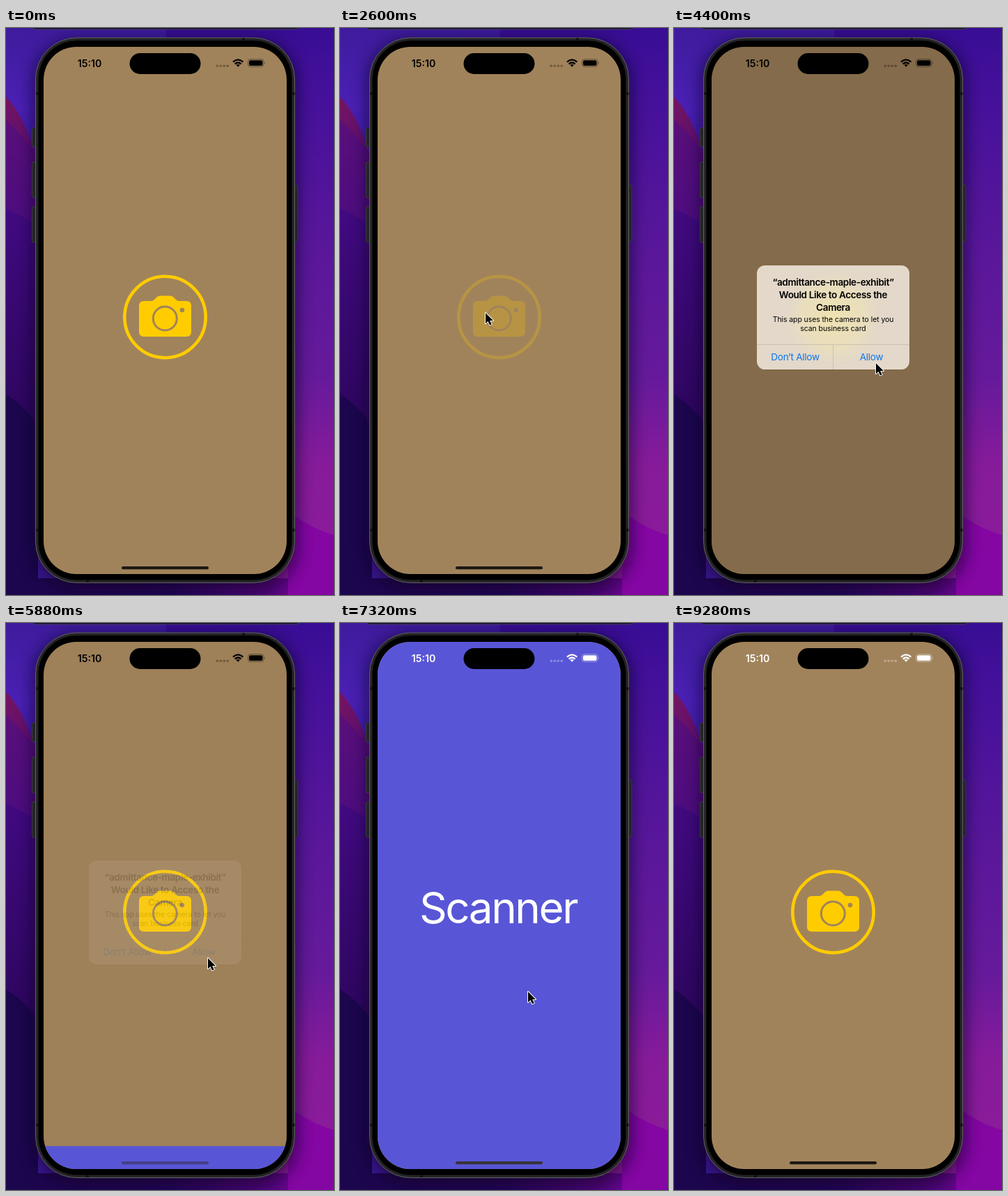
An HTML page for the animation above (9.32 s loop, 471 by 812 pixels).

```html
<!DOCTYPE html>
<html lang="en">
<head>
<meta charset="utf-8">
<title>Camera permission</title>
<style>
  html, body { margin: 0; width: 100%; height: 100%; overflow: hidden; background: #2a0e85; }
  svg { display: block; width: 100%; height: 100%; }
  text { font-family: Inter, Roboto, "Liberation Sans", sans-serif; text-anchor: middle; }
  .title { font-size: 13.6px; font-weight: 600; letter-spacing: -.4px; }
  .note { font-size: 10.5px; letter-spacing: -.09px; }
  .action { font-size: 13.6px; letter-spacing: -.3px; fill: #0a76ee; }
  .clock { font-size: 14.2px; font-weight: 600; }
  .heading { font-size: 62px; letter-spacing: -.04em; fill: #fff; }
</style>
</head>
<body>
<svg viewBox="0 0 471 812" preserveAspectRatio="none">
  <defs>
    <linearGradient id="top" x2="0" y2="1">
      <stop offset="0" stop-color="#3f1b9c"/><stop offset=".14" stop-color="#4a20b4"/>
      <stop offset=".24" stop-color="#3f1aa0"/>
    </linearGradient>
    <linearGradient id="wave" x2="0" y2="1">
      <stop offset="0" stop-color="#74145f"/><stop offset=".35" stop-color="#611073"/>
      <stop offset="1" stop-color="#4a0c78"/>
    </linearGradient>
    <linearGradient id="deep" x2="0" y2="1">
      <stop offset="0" stop-color="#410a80"/><stop offset="1" stop-color="#2a0558"/>
    </linearGradient>
    <linearGradient id="right" x2="0" y2="1">
      <stop offset="0" stop-color="#380d94"/><stop offset=".1" stop-color="#43109a"/>
      <stop offset=".4" stop-color="#5a179a"/><stop offset=".62" stop-color="#661a9b"/>
      <stop offset=".77" stop-color="#861b9a"/><stop offset="1" stop-color="#8e1c9a"/>
    </linearGradient>
    <linearGradient id="floor">
      <stop offset="0" stop-color="#1d064e"/><stop offset=".5" stop-color="#25065a"/>
      <stop offset=".8" stop-color="#56067f"/><stop offset="1" stop-color="#8606a3"/>
    </linearGradient>
    <radialGradient id="glow" gradientUnits="userSpaceOnUse" cx="228.5" cy="414" r="78">
      <stop offset="0" stop-color="#efe2b0"/><stop offset=".6" stop-color="#eadfba" stop-opacity=".8"/>
      <stop offset="1" stop-color="#e3d8ca" stop-opacity="0"/>
    </radialGradient>
    <filter id="blur" x="-20%" y="-20%" width="140%" height="140%"><feGaussianBlur stdDeviation="11"/></filter>
    <filter id="soft" x="-50%" y="-50%" width="200%" height="200%"><feGaussianBlur stdDeviation=".9"/></filter>
    <clipPath id="screen"><rect x="54" y="27" width="349" height="755" rx="47"/></clipPath>
    <clipPath id="card"><rect x="119" y="340" width="219" height="149" rx="11.5"/></clipPath>
    <path id="arrow" d="M0 0V15.2L3.5 11.9 6 17.6 8.7 16.4 6.2 10.9H11Z"/>
  </defs>

  <!-- wallpaper -->
  <rect width="471" height="812" fill="url(#top)"/>
  <rect x="230" width="241" height="812" fill="url(#right)"/>
  <rect y="788" width="471" height="24" fill="url(#floor)"/>
  <path d="M0 99C14 112 30 140 44 185V300H0Z" fill="url(#wave)"/>
  <path d="M0 132Q22 150 44 182V300H0Z" fill="#4d0e83" opacity=".55"/>
  <path d="M0 259Q24 268 46 285V620H0Z" fill="url(#deep)"/>
  <path d="M0 525Q26 540 46 570V812H0Z" fill="#1c064e"/>
  <path d="M471 726Q440 718 405 692V812H471Z" fill="#8406a3"/>
  <rect x="38" y="16" width="381" height="790" rx="62" fill="#080020" opacity=".6" filter="url(#blur)"/>
  <rect x="38" y="-8" width="383" height="10" rx="4" fill="#17102f" stroke="#4d4768" stroke-width=".8"/>

  <!-- phone body -->
  <g fill="#242426" stroke="#434345" stroke-width=".7">
    <rect x="37.5" y="143" width="7" height="27" rx="1.5"/>
    <rect x="37.5" y="192" width="7" height="51" rx="1.5"/>
    <rect x="37.5" y="256" width="7" height="51" rx="1.5"/>
    <rect x="412" y="225" width="7" height="81" rx="1.5"/>
  </g>
  <rect x="42.5" y="14" width="372" height="780.5" rx="59" fill="#252527" stroke="#626264"/>
  <rect x="46.5" y="18" width="364" height="772.5" rx="55" fill="#000" stroke="#101010"/>
  <g fill="#111">
    <rect x="43" y="92" width="3.5" height="4"/><rect x="43" y="717" width="3.5" height="4"/>
    <rect x="411" y="92" width="3.5" height="4"/><rect x="411" y="717" width="3.5" height="4"/>
    <rect x="339" y="14.5" width="4" height="3"/><rect x="115" y="791" width="4" height="3"/>
  </g>

  <g clip-path="url(#screen)">
    <rect x="53" y="26" width="351" height="757" fill="#a1835b"/>
    <g id="button">
      <circle cx="228.5" cy="414" r="58.2" fill="none" stroke="#fc0" stroke-width="4.6"/>
      <path fill="#fc0" d="M198 391H208.500Q211 391 213 389L216.500 385.500Q218.500 383.500 221.500 383.500H235.500Q238.500 383.500 240.500 385.500L244 389Q246 391 248.500 391H259Q266 391 266 398V435Q266 442 259 442H198Q191 442 191 435V398Q191 391 198 391Z"/>
      <circle cx="228.300" cy="416" r="17" fill="none" stroke="#a1835b" stroke-width="3"/>
      <circle cx="253" cy="404" r="3.300" fill="#a1835b"/>
    </g>
    <rect id="dim" x="53" y="26" width="351" height="757"/>
    <g id="sheet">
      <rect x="53" y="27" width="351" height="757" fill="#5856d6"/>
      <text class="heading" x="227" y="429.500">Scanner</text>
    </g>
    <rect id="home" x="166" y="771" width="125" height="4.300" rx="2.150"/>
  </g>

  <rect x="177.500" y="36" width="102" height="30" rx="15"/>

  <g id="status" fill="currentColor">
    <text class="clock" x="120" y="55.500">15:10</text>
    <g opacity=".3">
      <circle cx="303.300" cy="54.300" r="1.800"/><circle cx="308.300" cy="54.300" r="1.800"/>
      <circle cx="313.300" cy="54.300" r="1.800"/><circle cx="318.300" cy="54.300" r="1.800"/>
    </g>
    <g fill="none" stroke="currentColor" stroke-width="2.300">
      <path d="M326 48.700Q333.200 42 340.400 48.700"/>
      <path d="M328.700 51.600Q333.200 47.500 337.700 51.600"/>
    </g>
    <path d="M330.500 53Q333.200 50.900 335.900 53L333.200 55.800Z"/>
    <rect x="347.500" y="44.700" width="22.500" height="10.800" rx="3.500" fill="none" stroke="currentColor" opacity=".4"/>
    <rect x="349" y="46.200" width="19.500" height="7.800" rx="2.200"/>
    <path d="M371.200 48.300Q372.800 50.100 371.200 51.900Z" opacity=".5"/>
  </g>

  <g id="alert">
    <g clip-path="url(#card)">
      <rect x="119" y="340" width="219" height="149" fill="#e3d8ca"/>
      <rect x="119" y="340" width="219" height="149" fill="url(#glow)"/>
      <path d="M119 453.500H338M228.500 453.500V489" stroke="#c8bda9" stroke-width=".8"/>
    </g>
    <text class="title" x="228.500" y="369">“admittance-maple-exhibit”</text>
    <text class="title" x="228.500" y="387">Would Like to Access the</text>
    <text class="title" x="228.500" y="404.500">Camera</text>
    <text class="note" x="228.500" y="421">This app uses the camera to let you</text>
    <text class="note" x="228.500" y="434">scan business card</text>
    <text class="action" x="174" y="476.300">Don’t Allow</text>
    <text class="action" x="283.500" y="476.300">Allow</text>
  </g>

  <g id="cursor">
    <use href="#arrow" y="1.200" opacity=".4" filter="url(#soft)"/>
    <use href="#arrow" stroke="#fff" stroke-width="2" stroke-linejoin="round"/>
    <use href="#arrow"/>
  </g>
</svg>

<script>
const LOOP = 9320;
const TRAVEL = 755;
const $ = id => document.getElementById(id);
const [button, dim, sheet, home, status, alertBox, cursor] =
  ["button", "dim", "sheet", "home", "status", "alert", "cursor"].map($);

const ramp = (t, from, to) => Math.min(1, Math.max(0, (t - from) / (to - from)));
const smooth = p => p * p * (3 - 2 * p);
const mix = (a, b, p) => a + (b - a) * p;

// critically damped spring: stiffness 1000, mass 3
const spring = (t, start) => {
  const x = Math.sqrt(1000 / 3) * Math.max(0, t - start) / 1000;
  return 1 - (1 + x) * Math.exp(-x);
};

const shade = (a, b, p) => `rgb(${a.map((v, i) => Math.round(mix(v, b[i], p)))})`;

// time, x, y
const route = [
  [1300, 262, 830], [2250, 209, 408], [3400, 209, 408], [4200, 290, 480],
  [5880, 290, 480], [6300, 295, 744], [6560, 295, 744], [7200, 270, 528],
  [8100, 270, 528], [8800, 290, 830]
];

function locate(t) {
  let i = 0;
  while (i < route.length - 2 && t > route[i + 1][0]) i++;
  const [a, b] = [route[i], route[i + 1]];
  const p = smooth(ramp(t, a[0], b[0]));
  return [mix(a[1], b[1], p), mix(a[2], b[2], p)];
}

function draw(t) {
  const pressed = t >= 2540 && t < 2660;
  button.setAttribute("opacity", pressed ? .24 : t < 2660 ? 1 : mix(.24, 1, ramp(t, 2660, 2860)));

  const leave = 1 - ramp(t, 5660, 5910);
  const shown = ramp(t, 2900, 3100) * leave;
  dim.setAttribute("opacity", .18 * shown);
  alertBox.setAttribute("opacity", shown);
  const scale = mix(1.2, 1, spring(t, 2900));
  alertBox.setAttribute("transform",
    `translate(228.5 414.5) scale(${scale}) translate(-228.5 -414.5)`);

  const cover = spring(t, 5863) - spring(t, 7455);
  sheet.setAttribute("transform", `translate(0 ${TRAVEL * (1 - cover)})`);

  const visible = t < 4400 ? 1 - ramp(t, 2900, 3150) : ramp(t, 5740, 6050);
  home.setAttribute("opacity", visible);
  home.setAttribute("fill", shade([29, 24, 20], [56, 51, 58], ramp(cover, 0, .08)));

  status.setAttribute("color", shade([0, 0, 0], [255, 255, 255], ramp(t, 6450, 6650)));

  const [x, y] = locate(t);
  cursor.setAttribute("transform", `translate(${x} ${y})`);
}

const start = performance.now();
function tick() {
  draw((performance.now() - start) % LOOP);
  requestAnimationFrame(tick);
}
tick();
</script>
</body>
</html>
```
